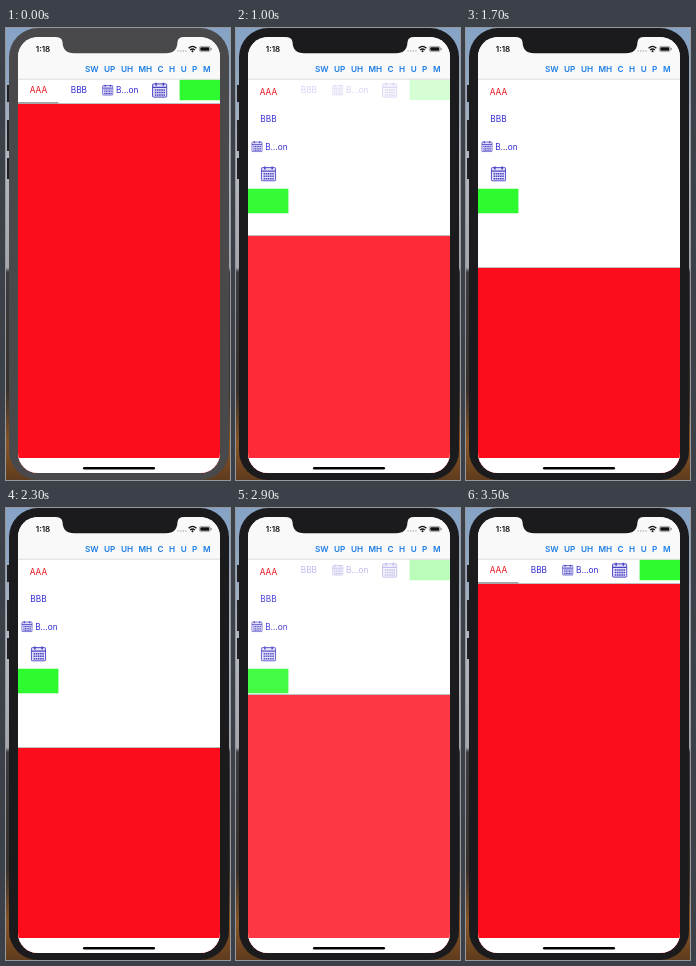
An HTML page for the animation above (3600 ms loop, 224x452 px).

```html
<!DOCTYPE html>
<html lang="en">
<head>
<meta charset="utf-8">
<title>Tab bar layout switch</title>
<style>
html, body { margin: 0; width: 100%; height: 100%; overflow: hidden; }
svg { display: block; width: 224px; height: 452px; }
text { font: 8.3px Inter, "Liberation Sans", sans-serif; fill: #2f27d0; }
.nav text { font-size: 8.2px; font-weight: 600; fill: #1a7ce6; }
.sel { fill: #e6141e; }
.mid { text-anchor: middle; }
</style>
</head>
<body>
<svg viewBox="0 0 224 452">
  <defs>
    <linearGradient id="sky" x2="0" y2="1">
      <stop offset="0" stop-color="#86a3c6"/>
      <stop offset=".1" stop-color="#8fa6c2"/>
      <stop offset=".3" stop-color="#b4b8c2"/>
      <stop offset=".53" stop-color="#a5a6ae"/>
      <stop offset=".54" stop-color="#3c3b40"/>
      <stop offset=".8" stop-color="#37302c"/>
      <stop offset=".92" stop-color="#8a5424"/>
      <stop offset="1" stop-color="#5e3c1e"/>
    </linearGradient>
    <clipPath id="glass"><rect x="12" y="9" width="202" height="436" rx="20"/></clipPath>
    <symbol id="cal" viewBox="0 0 16 16">
      <rect x=".8" y="1.8" width="14.4" height="13.4" rx="1" fill="#e4e2f8"/>
      <g fill="none" stroke="#4a42c4">
        <rect x=".8" y="1.8" width="14.4" height="13.4" rx="1"/>
        <path d="M1 5.4H15" stroke-width="1.3"/>
        <path d="M4.3 .6V3.6M11.7 .6V3.6" stroke-width="1.6"/>
        <path d="M3 8H13.4M3 10.5H13.4M3 13H13.4" stroke-width="1.5" stroke-dasharray="1.6 .6"/>
      </g>
    </symbol>
  </defs>

  <rect width="224" height="452" fill="url(#sky)"/>
  <g id="body">
    <path d="M1 57h3v17h-3zM1 92h3v31h-3zM1 130h3v21h-3zM221 98h2v48h-2z" fill="#202024"/>
    <rect x="3" width="220" height="452" rx="29"/>
  </g>

  <g clip-path="url(#glass)">
    <rect x="12" y="8" width="202" height="438" fill="#fff"/>
    <g id="row"></g>
    <g id="column"></g>
    <text id="first" class="mid sel" x="32.4">AAA</text>
    <g id="panel">
      <rect x="12" width="202" height="452" fill="#fff"/>
      <rect id="red" x="12" width="202" height="452" fill="#fd0d1b"/>
      <rect x="12" y="-1" width="202" height="1" fill="#c0c0c4"/>
    </g>
    <rect id="mark" x="12" y="74" width="40.4" height="2" fill="#a5a5a8"/>
    <rect x="12" y="8" width="202" height="43" fill="#f9f9f9"/>
    <path d="M12 51.2H214" stroke="#d2d2d4" stroke-width=".8"/>
    <rect x="12" y="430" width="202" height="16" fill="#fff"/>
    <rect x="77" y="439" width="72" height="2.5" rx="1.2"/>
  </g>

  <path id="notch" d="M49 8V9Q56 9 56.5 14Q57 25.3 68 25.3H160Q171 25.3 171.5 14Q172 9 178 9V8Z"/>
  <text x="29.8" y="23.8" style="font-size:8px;font-weight:600;fill:#111">1:18</text>
  <path d="M171.5 23H181" stroke="#999" stroke-width="1.2" stroke-dasharray="1.3 1.3"/>
  <g fill="none" stroke="#111" stroke-width="1.3">
    <path d="M182.6 20.2Q186.5 16.6 190.4 20.2M184.2 22Q186.5 20 188.8 22"/>
    <rect x="193.4" y="18.4" width="10.8" height="5.2" rx="1.5" stroke="#777" stroke-width=".6"/>
    <path d="M205.3 20V22" stroke="#777" stroke-width=".8"/>
  </g>
  <circle cx="186.5" cy="23.3" r="1" fill="#111"/>
  <rect x="194.3" y="19.2" width="9" height="3.6" rx=".8" fill="#111"/>
  <g class="nav" id="nav"></g>
</svg>
<script>
const LOOP = 3600, CELL = 40.4, LEFT = 12, RATE = 9.4;
const $ = id => document.getElementById(id);
const set = (id, attr, value) => $(id).setAttribute(attr, value);

// Every tab but the first; pos(i) gives the centre of each cell.
function tabs(pos, greenHeight) {
  const label = (i, text, dx) => {
    const [x, y] = pos(i);
    return `<text class="mid" x="${x + dx}" y="${y + 3.2}">${text}</text>`;
  };
  const icon = (i, size, dx) => {
    const [x, y] = pos(i);
    return `<use href="#cal" x="${x + dx - size / 2}" y="${y - size / 2}" width="${size}" height="${size}"/>`;
  };
  const [gx, gy] = pos(4);
  return label(1, "BBB", .3) +
    icon(2, 11.5, -11.2) + label(2, "B…on", 8.2) + icon(3, 15.8, .3) +
    `<rect x="${gx - CELL / 2}" y="${gy - greenHeight / 2}" width="${CELL}" height="${greenHeight}" fill="#2dfb2f"/>`;
}
$("row").innerHTML = tabs(i => [LEFT + CELL * (i + .5), 62], 20.5);
$("column").innerHTML = tabs(i => [LEFT + CELL / 2, 64 + 27.25 * i], 24.5);

const navX = [79, 98, 115, 132.5, 151.5, 163, 174.8, 186, 197];
$("nav").innerHTML = "SW UP UH MH C H U P M".split(" ")
  .map((s, i) => `<text x="${navX[i]}" y="44.3">${s}</text>`).join("");

const settle = (t, start) => t < start ? 0 : 1 - Math.exp(-RATE * (t - start) / 1000);

function draw(now) {
  const t = Math.floor(now % LOOP / 100) * 100;
  const p = t < 2800 ? settle(t, 826) : 1 - settle(t, 2858);
  const shell = t < 700 ? "#49494b" : "#1b1b1d";
  set("body", "fill", shell);
  set("notch", "fill", shell);
  set("row", "opacity", 1 - p);
  set("column", "opacity", 1 - (1 - p) ** 2);
  set("first", "y", 65.2 + 2 * Math.min(1, 2 * p));
  set("mark", "opacity", Math.max(0, 1 - 2 * p));
  set("panel", "transform", `translate(0 ${Math.round(76 + 164 * p)})`);
  set("red", "opacity", 1 - .8 * p * (1 - p)); // cross-fade dip
  requestAnimationFrame(draw);
}
draw(0);
</script>
</body>
</html>
```
